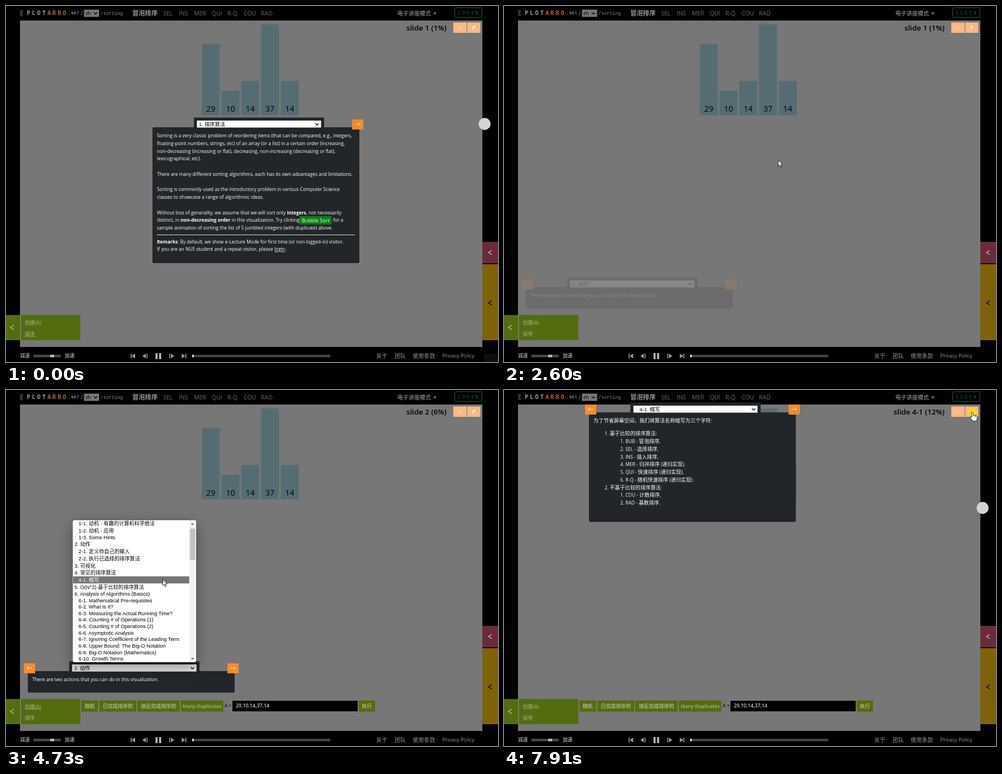
An HTML page for the animation above (8000 ms loop, 880 px wide and 637 px high).

```html
<!DOCTYPE html>
<html lang="zh-CN">
<head>
<meta charset="utf-8">
<title>Sorting lecture</title>
<style>
html, body { margin: 0; width: 100%; height: 100%; overflow: hidden; background: #000; }
svg { display: block; }
text { font-family: "Open Sans", "Noto Sans CJK SC", "Noto Sans CJK", sans-serif; white-space: pre; }
.arial { font-family: "Liberation Sans", "Noto Sans CJK SC", "Noto Sans CJK", sans-serif; }
.mono { font-family: "Liberation Mono", monospace; }
.pixel { font-family: "DejaVu Sans Mono", monospace; font-weight: 700; }
.body { font-weight: 500; }
.cjk { font-size: 9.15px; }
.shade { filter: drop-shadow(0 8px 13px rgba(0, 0, 0, .4)); }

#p1, #p2, #p3, #tools, #cursor { animation: 8s linear infinite; }
#p1 { animation-name: p1; }
#p2 { animation-name: p2; }
#p3 { animation-name: p3; }
#tools { animation-name: tools; }
#cursor { animation-name: travel; }
@keyframes p1 { 0%, 29.25% { opacity: 1 } 31.75%, 100% { opacity: 0 } }
@keyframes p2 { 0%, 31.6% { opacity: 0 } 39.1%, 62.6% { opacity: 1 } 65%, 100% { opacity: 0 } }
@keyframes p3 { 0%, 65% { opacity: 0 } 72.5%, 100% { opacity: 1 } }
@keyframes tools { 0%, 34.3% { opacity: 0 } 37.5%, 100% { opacity: 1 } }
@keyframes travel {
  0% { transform: translate(884px, 640px) }
  .9% { transform: translate(870px, 630px); animation-timing-function: ease-out }
  8.5%, 11.9% { transform: translate(682px, 474px); animation-timing-function: ease-in-out }
  18.8%, 20.5% { transform: translate(556px, 209px) }
  21.6% { transform: translate(541px, 222px) }
  24.75% { transform: translate(499px, 265px) }
  27.5%, 33.2% { transform: translate(490px, 275px) }
  42.5% { transform: translate(347px, 480px) }
  45%, 47.5% { transform: translate(331px, 497px) }
  50.5% { transform: translate(328px, 475px) }
  52.25% { transform: translate(321px, 452px) }
  53.1%, 54% { transform: translate(320px, 427px) }
  59.1%, 66.3% { transform: translate(280px, 338px) }
  72.6%, 74.2% { transform: translate(350px, 334px) }
  78% { transform: translate(364px, 322px) }
  81.75% { transform: translate(390px, 336px) }
  83.4% { transform: translate(497px, 356px) }
  84.25%, 85.1% { transform: translate(474px, 360px) }
  94.6%, 100% { transform: translate(836px, 43px) }
}
</style>
</head>
<body>
<svg id="stage" width="880" height="637" viewBox="0 0 880 637"></svg>
<script>
const LOOP = 8000;
const PANEL = '#222529', ORANGE = '#ff8a27', LIME = '#546c10', PALE = '#a9b58c';

const rect = (x, y, w, h, fill, more = '') =>
  `<rect x="${x}" y="${y}" width="${w}" height="${h}" fill="${fill}" ${more}/>`;
// y is the middle of the line
const text = (x, y, size, fill, str, more = '') =>
  `<text x="${x}" y="${y}" dy=".35em" font-size="${size}" fill="${fill}" ${more}>${str}</text>`;
const line = (d, color, width = 1) =>
  `<path d="${d}" fill="none" stroke="${color}" stroke-width="${width}"/>`;
const shape = (d, fill, more = '') => `<path d="${d}" fill="${fill}" ${more}/>`;
const on = (from, to) => `data-on="${from} ${to}"`;
const body = (x, y, str) => text(x, y, 8.42, '#fff',
  str.replace(/[\u3000-\u9fff\uff00-\uffef]+/g, '<tspan class="cjk">$&</tspan>'), 'class="body"');
const chevron = (x, y, color) => line(`M${x + 3} ${y - 4}L${x - 3} ${y}L${x + 3} ${y + 4}`, color, 1.4);
const center = 'text-anchor="middle"';

function header() {
  const tabs = { SEL: 281, INS: 309, MER: 336, QUI: 368, 'R-Q': 396, COU: 425, RAD: 456 };
  return rect(25, 7, 5, 11, '#3a3220')
    + text(37, 12, 10.5, '#999', 'PLOT<tspan fill="#b9641c">ARBO</tspan>', 'class="pixel" letter-spacing="2.9"')
    + text(112, 13, 6.5, '#999', '.NET', 'class="pixel" letter-spacing="1"')
    + text(133, 13, 9, '#999', '/', 'class="mono"')
    + rect(139.5, 6.5, 27, 13, '#777') + text(142, 13, 9.2, '#000', 'zh', 'class="arial"')
    + line('M157 11.5l3 3l3-3', '#000', 1.3)
    + text(169, 13, 8.3, '#888', '/sorting', 'class="mono"')
    + text(226, 13, 11.3, '#999', '冒泡排序', 'font-weight="700"')
    + Object.entries(tabs).map(([s, x]) => text(x, 13, 10.5, '#6a6a6a', s)).join('')
    + text(700, 13, 10, '#aaa', '电子讲座模式') + shape('M764.5 11.5h5l-2.5 4z', '#999')
    + rect(802.5, 3, 48.5, 17.5, 'none', 'rx="2" stroke="#0e6b47"')
    + text(808, 12, 9, '#0d5f40', 'LOGIN', 'class="mono" letter-spacing="2.4"');
}

function bars() {
  return [29, 10, 14, 37, 14].map((n, i) => {
    const x = 350.2 + i * 35.3, h = n * 4.39;
    return rect(x, 195.5 - h, 32, h, '#566c73') + text(x + 16, 184.5, 14.2, '#000', n, center);
  }).join('');
}

function slideLabel() {
  const label = (s, from, to) =>
    text(788, 39.5, 13.3, '#000', s, `text-anchor="end" font-weight="600" ${on(from, to)}`);
  return label('slide 1 (1%)', 0, 2740) + label('slide 2 (6%)', 2740, 5400) + label('slide 4-1 (12%)', 5400, LOOP)
    + rect(800, 29.5, 24, 18.5, '#fab886') + rect(825, 29.5, 23.5, 18.5, '#fab886')
    + text(812, 39.5, 7, '#fde0c6', 'Go', center)
    + text(836.5, 39, 11, '#fff', '✗', center)
    + `<circle cx="838" cy="40" r="9" fill="#fbd32f" ${on(7910, LOOP)}/>`;
}

function sides() {
  return rect(852, 422, 28, 38.5, '#6b2b3a') + chevron(866, 441, '#bbb')
    + rect(852, 462, 28, 136, '#7f620a') + chevron(866, 531, '#000')
    + rect(0, 553, 25, 45, LIME) + chevron(11, 575, '#bbb')
    + rect(27, 553, 106, 45, LIME)
    + text(33.5, 566.5, 9, PALE, '创建(A)') + text(33.5, 586.5, 9, PALE, '排序')
    + rect(34, 590.5, 18, .9, PALE, on(0, 2530))
    + rect(34, 570.5, 29, .9, PALE, on(2740, 5200));
}

function tools() {
  const button = (x, w, s) => rect(x, 555.5, w, 20, LIME)
    + text(x + w / 2, 565.5, /[A-Z]/.test(s) ? 8.7 : 9, PALE, s, center + ' font-weight="600"');
  return '<g id="tools">' + button(135, 29.5, '随机') + button(167, 66, '已完成排序的')
    + button(235, 75.5, '接近完成排序的') + button(313, 75.5, 'Many Duplicates')
    + text(391, 565.5, 8.5, '#000', 'A =') + rect(405, 556, 224, 19, '#000')
    + text(411, 565, 8.9, '#ccc', '29,10,14,37,14', 'font-weight="600"')
    + button(631, 29, '执行') + '</g>';
}

function footer() {
  const grey = '#999';
  return text(25, 626, 8.8, grey, '减速', 'font-weight="700"') + rect(49, 624, 49, 4.5, '#4a4a4a')
    + rect(79, 624, 7, 4.5, '#bbb') + text(105, 626, 8.8, grey, '加速', 'font-weight="700"')
    + rect(223, 622, 1.6, 8.5, grey) + shape('M231 622v8.5l-6-4.2z', grey)
    + shape('M250 622v8.5l-6-4.2z', grey) + rect(251.5, 622, 1.6, 8.5, grey)
    + rect(267.5, 621, 3.5, 11, '#bbb') + rect(274, 621, 3.5, 11, '#bbb')
    + rect(292, 622, 1.6, 8.5, grey) + shape('M295 622v8.5l6-4.2z', grey)
    + shape('M314.5 622v8.5l6-4.2z', grey) + rect(320.8, 622, 1.6, 8.5, grey)
    + rect(333, 624, 247, 4.5, '#444') + rect(333, 624, 3, 4.5, '#ddd')
    + text(662, 626, 10, grey, '关于') + text(695, 626, 10, grey, '团队')
    + text(727.5, 626, 10, grey, '使用条款') + text(780.5, 626, 9.15, grey, 'Privacy Policy')
    + rect(855, 622, 25, 15, '#0d0d0d', on(0, 70));
}

function panel(id, x, y, h, title, content, { back = true, indent = 3.5, extra = '' } = {}) {
  const arrow = (ax, dir) => rect(ax, y - 14, 20, 18, ORANGE)
    + line(`M${ax + 10 - 4.5 * dir} ${y - 5.5}h${9 * dir}m${-3 * dir}-2.5l${3 * dir} 2.5l${-3 * dir} 2.5`, '#fff');
  return `<g id="${id}">` + rect(x, y, 370, h, PANEL, 'rx="2"')
    + rect(x + 74, y - 17.5, 233, 19, PANEL, 'rx="1"')
    + rect(x + 79.5, y - 12, 222, 12.5, '#fff') + extra
    + text(x + 79.5 + indent, y - 5.7, 9.17, '#000', title, 'class="arial"')
    + line(`M${x + 291.5} ${y - 7}l3 3l3-3`, '#000', 1.3)
    + (back ? arrow(x - 7, -1) : '') + arrow(x + 357, 1) + content + '</g>';
}

function intro() {
  const strong = s => `<tspan font-weight="700">${s}</tspan>`;
  const lines = {
    232: 'Sorting is a very classic problem of reordering items (that can be compared, e.g., integers,',
    246: 'floating-point numbers, strings, etc) of an array (or a list) in a certain order (increasing,',
    259.7: 'non-decreasing (increasing or flat), decreasing, non-increasing (decreasing or flat),',
    273.5: 'lexicographical, etc).',
    301: 'There are many different sorting algorithms, each has its own advantages and limitations.',
    328.5: 'Sorting is commonly used as the introductory problem in various Computer Science',
    342.2: 'classes to showcase a range of algorithmic ideas.',
    369.7: `Without loss of generality, we assume that we will sort only ${strong('Integers')}, not necessarily`,
    383.5: `distinct, in ${strong('non-decreasing order')} in this visualization. Try clicking`,
    397.3: 'sample animation of sorting the list of 5 jumbled integers (with duplicate) above.',
    422: `${strong('Remarks')}: By default, we show e-Lecture Mode for first time (or non logged-in) visitor.`,
    435.5: 'If you are an NUS student and a repeat visitor, please <tspan text-decoration="underline">login</tspan>.'
  };
  return Object.entries(lines).map(([y, s]) => body(270, y, s)).join('')
    + rect(525, 376, 57.5, 15, '#0a7d10') + text(553.8, 383.5, 9.2, '#fff', 'Bubble Sort', center + ' class="body"')
    + body(585, 383.5, 'for a') + rect(270, 409, 354, 1, '#ddd');
}

function shortNames() {
  const items = ['1. 基于比较的排序算法:', '>1. BUB - 冒泡排序,', '>2. SEL - 选择排序,', '>3. INS - 插入排序,',
    '>4. MER - 归并排序 (递归实现),', '>5. QUI - 快速排序 (递归实现),', '>6. R-Q - 随机快速排序 (递归实现).',
    '2. 不基于比较的排序算法:', '>1. COU - 计数排序,', '>2. RAD - 基数排序.'];
  return body(160, 55, '为了节省屏幕空间，我们将算法名称缩写为三个字符:')
    + items.map((s, i) => body(s[0] === '>' ? 208 : 180, 78.3 + i * 13.77, s.replace('>', ''))).join('');
}

const topics = ['1. 排序算法', '1-1. 动机 - 有趣的计算机科学想法', '1-2. 动机 - 应用', '1-3. Some Hints', '2. 动作',
  '2-1. 定义你自己的输入', '2-2. 执行已选择的排序算法', '3. 可视化', '4. 常见的排序算法', '4-1. 缩写',
  '5. O(N^2) 基于比较的排序算法', '6. Analysis of Algorithms (Basics)', '6-1. Mathematical Pre-requisites',
  '6-2. What Is It?', '6-3. Measuring the Actual Running Time?', '6-4. Counting # of Operations (1)',
  '6-5. Counting # of Operations (2)', '6-6. Asymptotic Analysis', '6-7. Ignoring Coefficient of the Leading Term',
  '6-8. Upper Bound: The Big-O Notation', '6-9. Big-O Notation (Mathematics)', '6-10. Growth Terms'];

// hovers: [time, row] pairs; the last one lasts until the list closes
function dropdown(x, y, scroll, thumb, hovers, close) {
  let top = -scroll, rows = '';
  topics.forEach((s, i) => {
    const h = /[\u4e00-\u9fff]/.test(s) ? 12.72 : 11.65;
    const left = /^\d+-/.test(s) ? 10.3 : 3;
    const label = fill => text(left, top + h / 2, 9.17, fill, s, 'class="arial"');
    rows += label('#000');
    hovers.forEach(([t, row], k) => {
      if (row !== i) return;
      const end = hovers[k + 1] ? hovers[k + 1][0] : close;
      rows += `<g ${on(t, end)}>${rect(0, top, 208.5, h, '#767676')}${label('#fff')}</g>`;
    });
    top += h;
  });
  return `<g ${on(hovers[0][0], close)}>` + rect(x, y, 220.5, 254, '#fff', 'rx="3" class="shade"')
    + `<svg x="${x}" y="${y}" width="220.5" height="254">` + rows
    + rect(208.5, 0, 11, 254, '#f1f1f1') + rect(209.5, thumb, 9.5, 56, '#c1c1c1')
    + shape('M211.5 8h5l-2.5-3z', scroll ? '#505050' : '#a3a3a3')
    + shape('M211.5 246.5h5l-2.5 3z', '#505050') + '</svg></g>';
}

function pointers() {
  const outline = 'stroke="#000" stroke-width=".8" stroke-linejoin="round"';
  return `<g id="cursor"><g ${on(70, 7640)}>`
    + shape('M.5 .5V12L3.1 9.6L5 13.8L6.7 13L4.9 9H8.2Z', '#fff', outline) + '</g></g>'
    + `<g ${on(7640, LOOP)}>`
    + shape('M836 40.5q1.3-1.5 2.4 0l.9 5 1.9-.2 1.8 .4 1.8 .5q1.9 .6 1.7 2.8l-.5 3.5-1.3 3h-6.5l-2.6-4-2.2-2.4q-.3-1.7 1.7-1.4l2 1.4z', '#fff', outline)
    + line('M841.2 46v2.5M843.3 46.5v2.3', '#000', .6) + '</g>';
}

const badge = (from, to) => `<circle cx="856" cy="211" r="10.7" fill="#d4d4d4" ${on(from, to)}/>`;

const ring = `<g ${on(5400, 7910)}>`
  + rect(230.7, 27, 223.6, 14.6, '#fff', 'rx="2.5"')
  + rect(231.8, 28.1, 221.4, 12.4, '#fff', 'rx="1.5" stroke="#000" stroke-width="1.1"') + '</g>';

document.getElementById('stage').innerHTML =
  rect(0, 0, 880, 637, '#000') + rect(25, 26, 827, 584, '#777')
  + header() + bars() + slideLabel() + sides() + tools() + footer()
  + panel('p1', 262, 217, 243, '1. 排序算法', intro(), { back: false })
  + panel('p2', 39, 503, 38.5, '2. 动作', body(47, 518, 'There are two actions that you can do in this visualization.'),
      { extra: rect(118.5, 491, 222, 12.5, '#e6e6e6', on(3500, 5010)) })
  + panel('p3', 152, 40, 196, '4-1. 缩写', shortNames(), { indent: 11, extra: ring })
  + dropdown(342, 222, 0, 12, [[1600, 0], [1860, 1], [1930, 2], [2060, 3], [2120, 4]], 2340)
  + dropdown(119.5, 233, 13, 15, [[3640, 4], [4000, 21], [4060, 20], [4120, 19], [4250, 17], [4320, 16],
      [4390, 14], [4460, 13], [4530, 11], [4600, 10], [4670, 9]], 5010)
  + badge(0, 300) + badge(7300, LOOP) + pointers();

// hard switches: visible only between the two times
for (const el of document.querySelectorAll('[data-on]')) {
  const [from, to] = el.dataset.on.split(' ').map(Number);
  const key = (opacity, t) => ({ opacity, offset: t / LOOP, easing: 'step-end' });
  const keys = [key(from ? 0 : 1, 0)];
  if (from) keys.push(key(1, from));
  if (to < LOOP) keys.push(key(0, to));
  keys.push(key(to < LOOP ? 0 : 1, LOOP));
  el.animate(keys, { duration: LOOP, iterations: Infinity });
}
</script>
</body>
</html>
```
